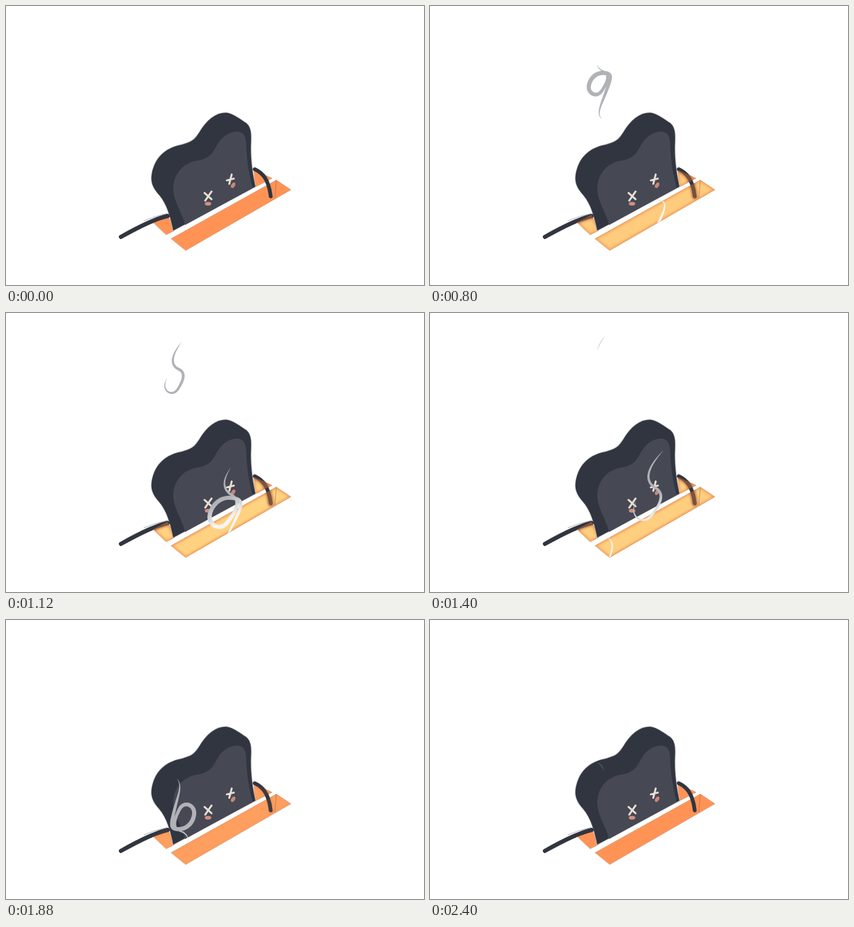
Recreate the animation shown at these times as an HTML page. Size 600x400 px, loop 2440 ms.

```html
<!DOCTYPE html>
<html lang="en">
<head>
<meta charset="utf-8">
<title>Burnt toast</title>
<style>
  html, body { margin: 0; width: 100%; height: 100%; overflow: hidden; background: #fff; }
  svg { display: block; width: 600px; height: 400px; }
  .line { fill: none; stroke-linecap: round; stroke-linejoin: round; }
</style>
</head>
<body>
<svg viewBox="0 0 600 400">
  <defs>
    <path id="slots" d="M211 310L232 299L242 322L230 328ZM356 235L382 247L357 260ZM237 333.500L388 249.500L409 263.500L258 350.500Z"/>
    <path id="leftArm" d="M232 301C213 305 190 317 165 331"/>
    <path id="rightArm" d="M357 234C368 239 377 248 380 273"/>
    <clipPath id="inSlots"><use href="#slots"/></clipPath>
    <clipPath id="aboveSlot"><path d="M0 0H600V155L258 350L0 180Z"/></clipPath>
    <filter id="soft" x="-20%" y="-20%" width="140%" height="140%"><feGaussianBlur stdDeviation="1.800"/></filter>
    <linearGradient id="tint" gradientUnits="userSpaceOnUse" x1="314" y1="298" x2="301" y2="274">
      <stop offset="0" stop-color="#f6f5f4"/><stop offset="1" stop-color="#b0b2b8"/>
    </linearGradient>
  </defs>

  <!-- glowing slots -->
  <use id="heat" href="#slots"/>
  <g clip-path="url(#inSlots)">
    <use class="glow" href="#slots" fill="none" stroke="#f58a45" stroke-width="4" filter="url(#soft)"/>
  </g>
  <use href="#slots" class="line" stroke="#a0735c" stroke-width=".7" opacity=".5"/>
  <path class="line" d="M388 250L386 275" stroke="#a3623c" stroke-width=".8" opacity=".7"/>

  <!-- toast -->
  <path fill="#31353f" stroke="#c2c3c9" stroke-width="1.500" paint-order="stroke" d="M240 322C236 302 231 284 220 271C210 260 208 252 209 243C212 222 224 206 247 200C268 195 270 192 277 182C288 163 301 153 316 153C327 154 338 164 345 168C353 175 352 186 351.500 200C351 222 354 240 358 259Z"/>
  <path fill="#464853" d="M257 314C253 296 241 282 240 263C240 240 254 224 278 221C294 217 297 210 303 199C310 187 320 180 333 180C343 181 345 190 345 203C346 225 349 240 354 261Z"/>

  <!-- arms, browned where the heat reaches them -->
  <path class="line" d="M231 297.500Q214 301 198 308" stroke="#b5b6bc"/>
  <g class="line" stroke="#31353f">
    <use href="#leftArm" stroke-width="6"/>
    <use href="#rightArm" stroke-width="5.500"/>
  </g>
  <g clip-path="url(#inSlots)">
    <g class="line glow" stroke="#a35f3c" stroke-width="9" opacity="0" filter="url(#soft)" style="mix-blend-mode: multiply">
      <use href="#leftArm"/><use href="#rightArm"/>
    </g>
  </g>

  <!-- face -->
  <path class="line" d="M285 268L295 277M295 266L286 279M317 250L327 247.500M324 241.500L320.500 255" stroke="#e9e0d7" stroke-width="2.800"/>
  <ellipse cx="290" cy="283.500" rx="4.600" ry="2.700" fill="#d08f7f"/>
  <ellipse cx="326" cy="257" rx="2.600" ry="4.300" transform="rotate(32 326 257)" fill="#c98776"/>

  <g id="smoke" fill="url(#tint)" clip-path="url(#aboveSlot)"></g>
</svg>
<script>
  const LOOP = 2440, TICK = 40, FPS = 15, RISE = 0.037, SAMPLES = 180;

  // One curl, foot to tip, around its ring; every wisp is a turned copy of it.
  const CURL = "M9 54C-8 46 3 30 10 10S19 -16 5 -16S-16 -2 -15 6S-3 20 4 9S16 -14 5 -19S-8 -36 9 -58";

  // x, y: ring centre at time `at`. A flipped wisp is upside down and grows from the curl's tip.
  const wisps = [
    { x: 243, y: 112, at: 800, delay: 0, size: 1, turn: 0 },
    { x: 314, y: 287, at: 1120, delay: 260, size: 1.4, turn: 6 },
    { x: 254, y: 281, at: 1880, delay: 960, size: 1.1, turn: -6, flip: true }
  ];

  const clamp = x => Math.min(1, Math.max(0, x));
  const ease = (t, from, to) => (1 - Math.cos(Math.PI * clamp((t - from) / (to - from)))) / 2;
  const bump = (t, from, to) => Math.sin(Math.PI * clamp((t - from) / (to - from)));
  const mix = (a, b, k) => a.map((v, i) => Math.round(v + (b[i] - v) * k));
  const newPath = () => document.createElementNS("http://www.w3.org/2000/svg", "path");

  function sampleCurl({ x, y, size, turn, flip }) {
    const path = newPath();
    path.setAttribute("d", CURL);
    const length = path.getTotalLength();
    const angle = (turn + (flip ? 180 : 0)) * Math.PI / 180;
    const cos = Math.cos(angle) * size, sin = Math.sin(angle) * size;
    return Array.from({ length: SAMPLES + 1 }, (_, i) => {
      const s = i / SAMPLES;
      const p = path.getPointAtLength(length * (flip ? 1 - s : s));
      return { s, x: x + p.x * cos - p.y * sin, y: y + p.x * sin + p.y * cos };
    });
  }

  // Tapered outline of the part of the curve between tail and head.
  function ribbon(curve, tail, head, width, lift) {
    const part = curve.filter(p => p.s >= tail && p.s <= head);
    if (part.length < 3) return "";
    const left = [], right = [];
    part.forEach((p, i) => {
      const a = part[Math.max(0, i - 1)], b = part[Math.min(part.length - 1, i + 1)];
      const half = width / 2 * Math.pow(bump(p.s, tail, head), 0.8);
      const k = half / Math.hypot(b.x - a.x, b.y - a.y);
      const nx = (a.y - b.y) * k, ny = (b.x - a.x) * k;
      left.push(`${p.x + nx} ${p.y + ny - lift}`);
      right.unshift(`${p.x - nx} ${p.y - ny - lift}`);
    });
    return "M" + [...left, ...right].join("L") + "Z";
  }

  const heat = document.getElementById("heat");
  const glows = document.querySelectorAll(".glow");
  for (const w of wisps) {
    w.curve = sampleCurl(w);
    w.path = newPath();
    document.getElementById("smoke").append(w.path);
  }

  function draw(t) {
    const swell = 1 - ease(Math.abs(t - 1140), 0, 1130);
    const glow = swell * swell * (3 - 2 * swell);
    heat.setAttribute("fill", `rgb(${mix([255, 147, 86], [255, 210, 130], glow)})`);
    glows.forEach(g => g.setAttribute("opacity", 0.7 * glow));

    for (const w of wisps) {
      const age = t - w.delay;
      const head = ease(age, 200, 1000), tail = ease(age, 700, 1600);
      const width = 6.2 * bump(age, 150, 1550) ** 2;
      w.path.setAttribute("d", ribbon(w.curve, tail, head, width, (t - w.at) * RISE));
    }
  }

  // Poses change 15 times a second, on a 40 ms clock.
  const start = performance.now();
  function tick() {
    const slot = Math.floor((performance.now() - start) % LOOP / TICK);
    draw(Math.floor((slot + 0.5) * TICK * FPS / 1000) * 1000 / FPS);
    requestAnimationFrame(tick);
  }
  tick();
</script>
</body>
</html>
```
